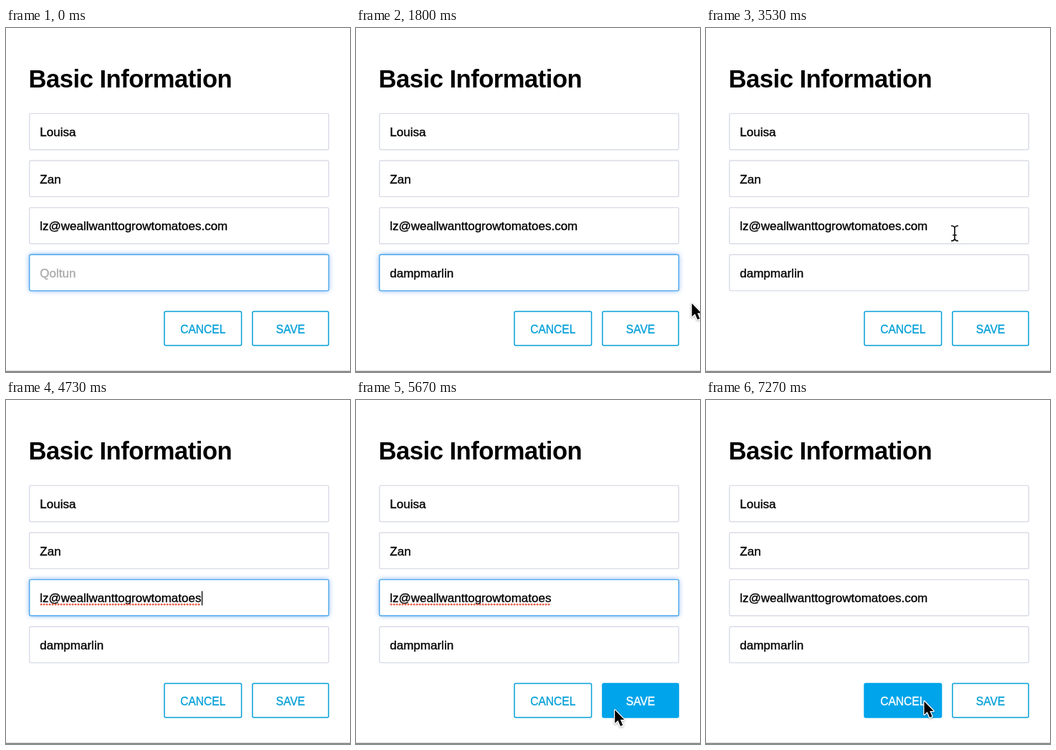
An HTML page with a canvas for the animation above (7540 ms loop, 480 by 480 pixels).

```html
<!DOCTYPE html>
<html lang="en">
<head>
<meta charset="utf-8">
<title>Basic Information</title>
<style>
  html, body { margin: 0; width: 100%; height: 100%; overflow: hidden; background: #fff; }
  canvas { display: block; width: 480px; height: 480px; }
</style>
</head>
<body>
<canvas id="stage"></canvas>
<script>
const canvas = document.getElementById('stage');
const ctx = canvas.getContext('2d');
const ratio = window.devicePixelRatio || 1;
canvas.width = canvas.height = 480 * ratio;
ctx.scale(ratio, ratio);

const LOOP = 7540;
const TICK = 1000 / 15;
const SANS = '"Liberation Sans", Arial, sans-serif';
const BLUE = '#06a0d8';
const HOT = '#00a4ea';

const FIRST = 'Louisa';
const LAST = 'Zan';
const EMAIL = 'lz@weallwanttogrowtomatoes.com';
const HANDLE = 'dampmarlin';
const HINT = 'Qoltun';

const button = (label, x, w) => ({ label, x, w, y: 395.5, h: 47.6 });
const CANCEL = button('CANCEL', 221, 107.6);
const SAVE = button('SAVE', 343.9, 106.2);
const FIELDS = [0, 1, 2, 3].map(i => ({ x: 32.7, y: 119.4 + i * 65.6, w: 417.6, h: 50.4 }));

// Events, in ticks
const TYPE = 15, TYPED = 21, SAVED = 34;
const FOCUS = 54, ERASE = 58, CHECKED = 71, NUDGE = 75, CARET_OFF = 79;
const REJECTED = 88, RESET = 108;

const ENTRY = { x: 477, y: 378 };
const MOVES = [
  { from: 25, to: 35, x: 392, y: 424 },
  { from: 44, to: 49, x: 347, y: 286.5 },
  { from: 74, to: 86, x: 361, y: 434 },
  { from: 86, to: 93, x: 394, y: 427.5 },
  { from: 100, to: 109, x: 304, y: 419 }
];

const clamp = (v, lo, hi) => Math.min(hi, Math.max(lo, v));
const within = (k, from, to) => k >= from && k < to;
const smooth = f => f * f * (3 - 2 * f);
const inside = (p, r) => p && p.x >= r.x && p.x <= r.x + r.w && p.y >= r.y && p.y <= r.y + r.h;

function pointerAt(k) {
  if (k < MOVES[0].from || within(k, 60, NUDGE)) return null; // hidden while keys are used
  return MOVES.reduce((p, m) => {
    const f = smooth(clamp((k - m.from) / (m.to - m.from), 0, 1));
    return { x: p.x + (m.x - p.x) * f, y: p.y + (m.y - p.y) * f };
  }, ENTRY);
}

function handleAt(k) {
  return HANDLE.slice(0, clamp(Math.ceil((k - TYPE + 1) * HANDLE.length / 3), 0, HANDLE.length));
}

function emailAt(k) {
  const erased = k < RESET ? clamp(Math.floor((k - ERASE) / 3), 0, '.com'.length) : 0;
  return EMAIL.slice(0, EMAIL.length - erased);
}

function box(r, line, width, fill) {
  ctx.beginPath();
  ctx.roundRect(r.x, r.y, r.w, r.h, 2);
  ctx.fillStyle = fill;
  ctx.fill();
  ctx.shadowColor = 'transparent';
  ctx.strokeStyle = line;
  ctx.lineWidth = width;
  ctx.stroke();
}

function write(text, x, y, size, color, align = 'left') {
  ctx.font = size + 'px ' + SANS;
  ctx.textAlign = align;
  ctx.fillStyle = ctx.strokeStyle = color;
  ctx.lineWidth = 0.35;
  ctx.fillText(text, x, y);
  ctx.strokeText(text, x, y);
}

function drawTitle() {
  ctx.font = 'bold 34.6px ' + SANS;
  ctx.letterSpacing = '-0.5px';
  ctx.textAlign = 'left';
  ctx.fillStyle = '#000';
  ctx.fillText('Basic Information', 31.6, 82.6);
  ctx.letterSpacing = '0px';
}

function drawField(r, text, opt = {}) {
  const x = 47.3, base = r.y + 31.5;
  if (opt.focus) {
    ctx.shadowColor = 'rgba(70, 140, 240, 0.75)';
    ctx.shadowBlur = 7 * ratio;
  }
  const line = opt.error ? '#e8281e' : opt.focus ? '#4fa8ec' : '#d9dbe8';
  box(r, line, 1.4, '#fff');
  write(text || opt.hint, x, base, 17, text ? '#000' : '#a9a9a9');
  const end = x + ctx.measureText(text).width;
  if (opt.misspelt) {
    ctx.fillStyle = '#ea5a44';
    for (let d = x + 1.8; d < end; d += 4) {
      ctx.beginPath();
      ctx.arc(d, base + 3.2, 1.4, 0, Math.PI * 2);
      ctx.fill();
    }
  }
  if (opt.caret) {
    ctx.fillStyle = '#000';
    ctx.fillRect(end + 0.5, base - 15.5, 1.3, 20);
  }
}

function drawButton(b, hot) {
  box(b, hot ? HOT : BLUE, 1.5, hot ? HOT : '#fff');
  write(b.label, b.x + b.w / 2, b.y + 30, 15.6, hot ? '#fff' : BLUE, 'center');
}

function drawArrow() {
  ctx.beginPath();
  [[0.5, 1.5], [0.5, 20], [4.8, 16], [8.3, 24], [11.5, 22.6], [8.2, 15], [13.5, 15]]
    .forEach(([x, y]) => ctx.lineTo(x, y));
  ctx.closePath();
  ctx.lineJoin = 'round';
  ctx.shadowColor = 'rgba(0, 0, 0, 0.35)';
  ctx.shadowBlur = 3 * ratio;
  ctx.shadowOffsetY = ratio;
  ctx.strokeStyle = '#fff';
  ctx.lineWidth = 2.6;
  ctx.stroke();
  ctx.shadowColor = 'transparent';
  ctx.shadowOffsetY = 0;
  ctx.fillStyle = '#000';
  ctx.fill();
}

function drawBeam() {
  ctx.beginPath();
  for (const s of [-1, 1]) {
    ctx.moveTo(-5, s * 10.5);
    ctx.quadraticCurveTo(-0.5, s * 10.5, 0, s * 7.5);
    ctx.quadraticCurveTo(0.5, s * 10.5, 5, s * 10.5);
  }
  ctx.moveTo(0, -8);
  ctx.lineTo(0, 8);
  ctx.moveTo(-2.8, 2.5);
  ctx.lineTo(2.8, 2.5);
  for (const [color, width] of [['#fff', 3.6], ['#111', 1.7]]) {
    ctx.strokeStyle = color;
    ctx.lineWidth = width;
    ctx.stroke();
  }
}

function draw(k) {
  const p = pointerAt(k);
  ctx.fillStyle = '#fff';
  ctx.fillRect(0, 0, 480, 480);
  drawTitle();

  drawField(FIELDS[0], FIRST);
  drawField(FIELDS[1], LAST);
  drawField(FIELDS[2], emailAt(k), {
    focus: within(k, FOCUS, REJECTED),
    error: within(k, REJECTED, RESET),
    caret: within(k, FOCUS, CARET_OFF),
    misspelt: within(k, CHECKED, REJECTED)
  });
  drawField(FIELDS[3], handleAt(k), {
    hint: HINT,
    focus: k < SAVED,
    caret: within(k, TYPE, TYPED),
    misspelt: within(k, TYPE + 2, TYPED)
  });

  drawButton(CANCEL, inside(p, CANCEL));
  drawButton(SAVE, inside(p, SAVE));

  ctx.fillStyle = '#808080';
  ctx.fillRect(0, 478.5, 480, 1.5);

  if (!p) return;
  ctx.save();
  ctx.translate(p.x, p.y);
  if (FIELDS.some(r => inside(p, r))) drawBeam();
  else drawArrow();
  ctx.restore();
}

const start = performance.now();
function frame() {
  const t = (performance.now() - start) % LOOP;
  draw(Math.floor((t + 5) / TICK));
  requestAnimationFrame(frame);
}
frame();
</script>
</body>
</html>
```
